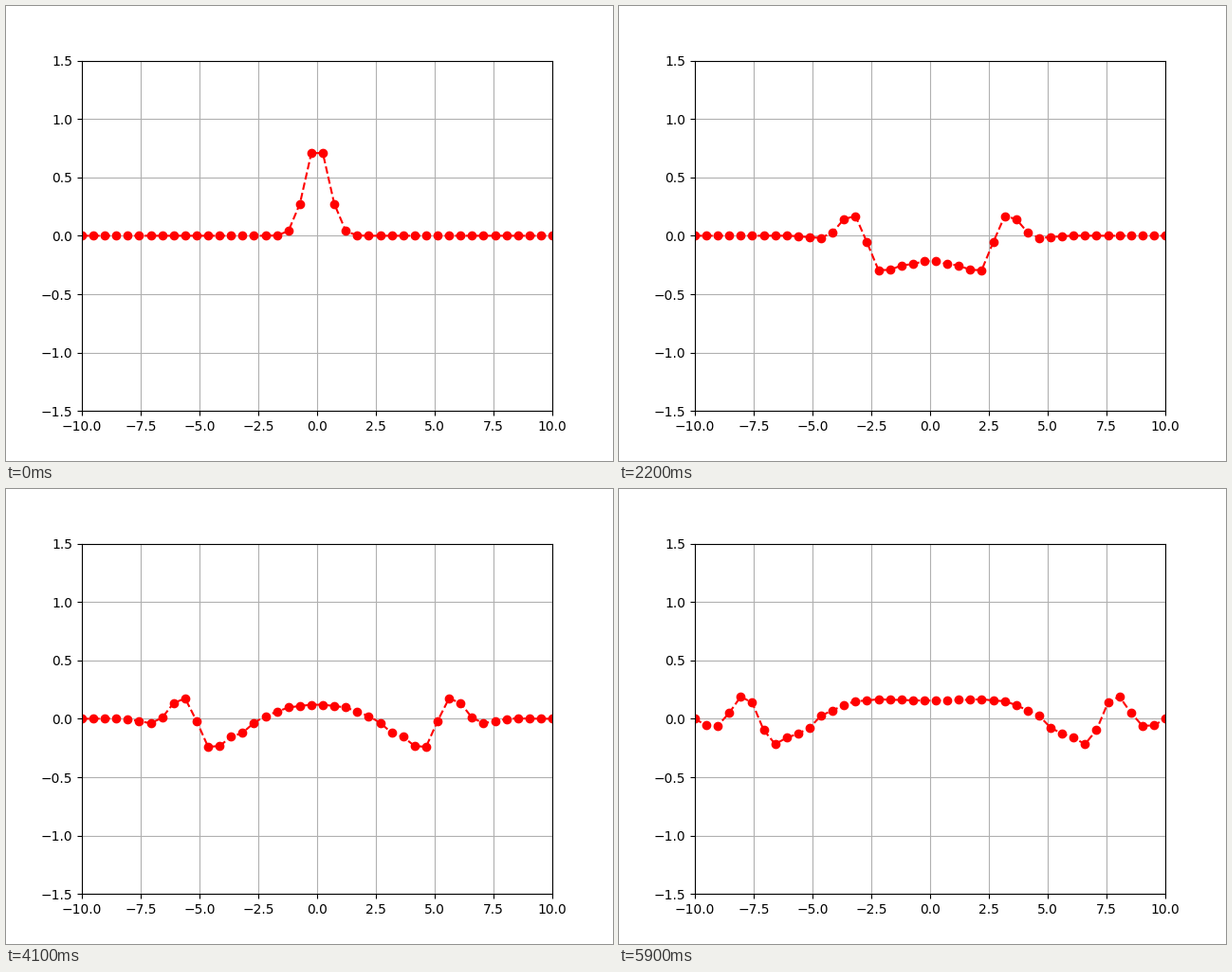
A matplotlib script that plays this animation: 640 by 480 pixels, repeating every 6000 ms.

```python
import numpy as np
import matplotlib.pyplot as plt
from matplotlib.animation import FuncAnimation

FRAMES = 60
INTERVAL = 100
POINTS = 42
DT = 0.207      # time step
MASS = 2.0      # strength of the sine restoring force

x = np.linspace(-10, 10, POINTS)
dx = x[1] - x[0]


def pulse(x, sigma=0.5):
    """Normalised bell curve around zero."""
    return np.exp(-0.5 * (x / sigma) ** 2) / (sigma * np.sqrt(2 * np.pi))


def solve():
    """Sine-Gordon wave with fixed ends, starting at rest."""
    u = np.zeros((FRAMES, POINTS))
    u[0] = pulse(x)
    speed = np.zeros(POINTS)
    for n in range(1, FRAMES):
        now = u[n - 1]
        curve = (now[2:] - 2 * now[1:-1] + now[:-2]) / dx ** 2
        speed[1:-1] += DT * (curve - MASS ** 2 * np.sin(now[1:-1]))
        u[n] = now + DT * speed
    return u


wave = solve()

fig, ax = plt.subplots(figsize=(6.4, 4.8), dpi=100)
ax.set_xlim(-10, 10)
ax.set_ylim(-1.5, 1.5)
ax.grid(True)
line, = ax.plot(x, wave[0], "ro--")


def update(n):
    line.set_ydata(wave[n])
    return line,


anim = FuncAnimation(fig, update, frames=FRAMES, interval=INTERVAL,
                     repeat=True, repeat_delay=0)
plt.show()
```
